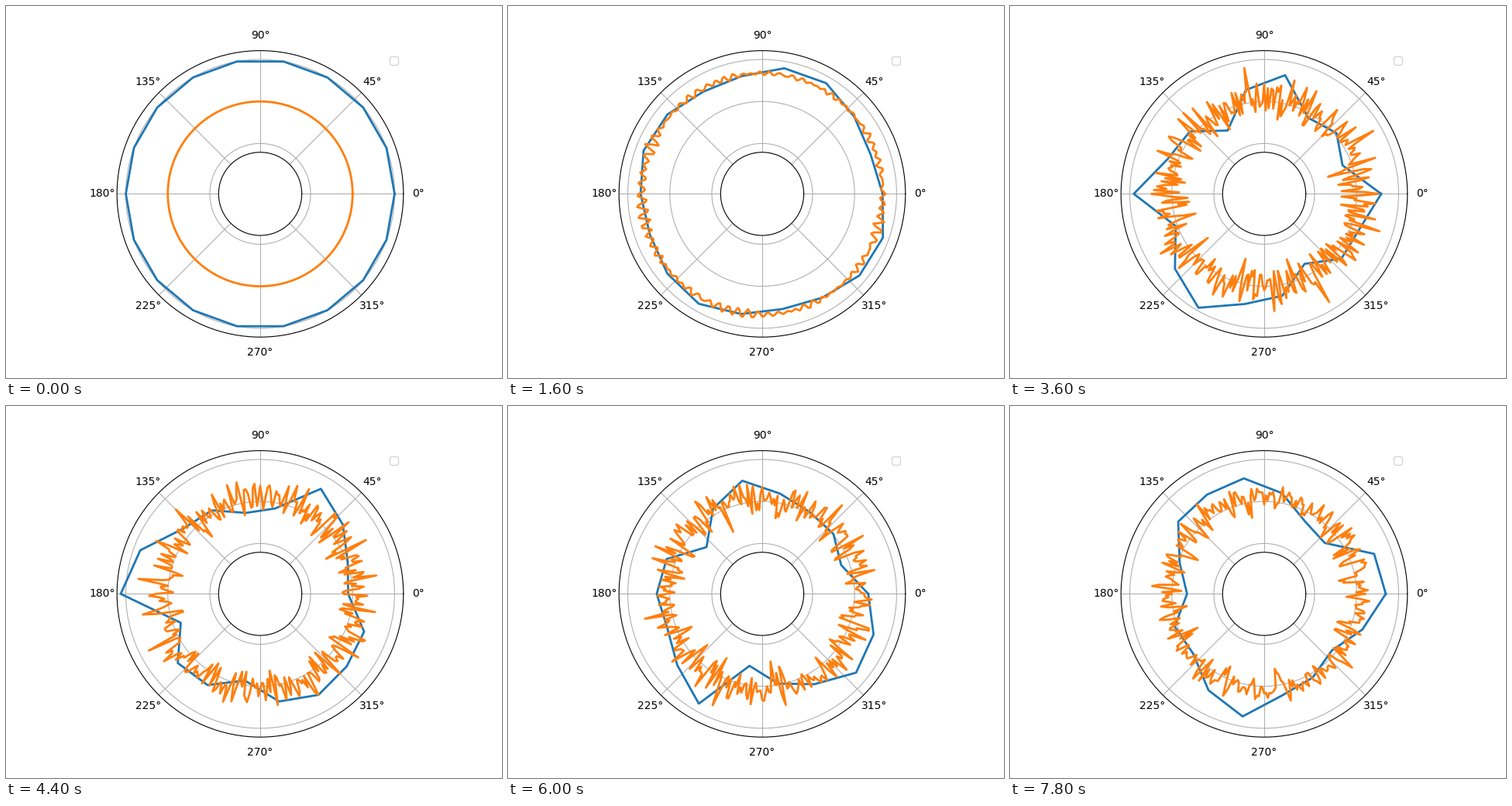
A matplotlib script that plays this animation: 640x480 px, repeating every 8000 ms.

```python
import numpy as np
import matplotlib.pyplot as plt
from matplotlib.animation import FuncAnimation

# Two-scale Lorenz-96 ring: K slow cells, each coupled to J fast ones
K, J = 18, 20
FORCE, EPS = 10.0, 0.5
FRAMES, INTERVAL = 40, 200
STEP, SUBSTEPS = 0.1, 20

# Slow ripple once it shows (time 0.8): wave number, amplitude, phase
WAVES = [(3, 0.52, -1.85), (4, 1.23, -1.76), (5, 0.11, 0.67)]


def shift(v, n):
    """Value n cells further round the ring."""
    return np.roll(v, -n)


def rates(s):
    x, y = s[:K], s[K:]
    dx = (shift(x, 1) - shift(x, -2)) * shift(x, -1) - x + FORCE
    dx -= y.reshape(J, K).mean(axis=0)
    dy = shift(y, 1) * (shift(y, -1) - shift(y, 2)) - y + np.tile(x, J)
    return np.concatenate([dx, dy / EPS])


def advance(s):
    h = STEP / SUBSTEPS
    for _ in range(SUBSTEPS):
        a = rates(s)
        b = rates(s + h / 2 * a)
        c = rates(s + h / 2 * b)
        d = rates(s + h * c)
        s = s + h / 6 * (a + 2 * b + 2 * c + d)
    return s


def seed_ripple(mean_integral=7.07, span=0.8):
    """Tiny ripple that grows linearly into WAVES after the given span."""
    cell = np.arange(K)
    ripple = np.zeros(K)
    for m, amp, phase in WAVES:
        theta = 2 * np.pi * m / K
        growth = mean_integral * (np.exp(1j * theta) - np.exp(-2j * theta)) - span
        ripple += (amp * np.exp(1j * (theta * cell - phase) - growth)).real
    return ripple


def simulate():
    rng = np.random.default_rng(4)
    state = np.concatenate([FORCE + seed_ripple(),
                            2e-3 * rng.standard_normal(K * J)])
    states = [state]
    for _ in range(FRAMES - 1):
        states.append(advance(states[-1]))
    return np.array(states) / FORCE


def closed(v):
    return np.append(v, v[0])


def ring(ax, count):
    angles = np.linspace(0, 2 * np.pi, count + 1)
    return ax.plot(angles, np.zeros(count + 1), lw=2)[0]


history = simulate()

fig = plt.figure(figsize=(6.4, 4.8), dpi=100)
ax = fig.add_subplot(projection="polar")
slow = ring(ax, K)
fast = ring(ax, K * J)
ax.set_yticks([-1, 0, 1])
ax.set_yticklabels([])
ax.set_ylim(-1.21, 1.21)
ax.set_rorigin(-2.2)
ax.legend([], [], loc="upper right")


def draw(n):
    slow.set_ydata(closed(history[n, :K]))
    fast.set_ydata(closed(history[n, K:]))
    return slow, fast


anim = FuncAnimation(fig, draw, frames=FRAMES, interval=INTERVAL,
                     repeat=True, repeat_delay=0)
plt.show()
```
